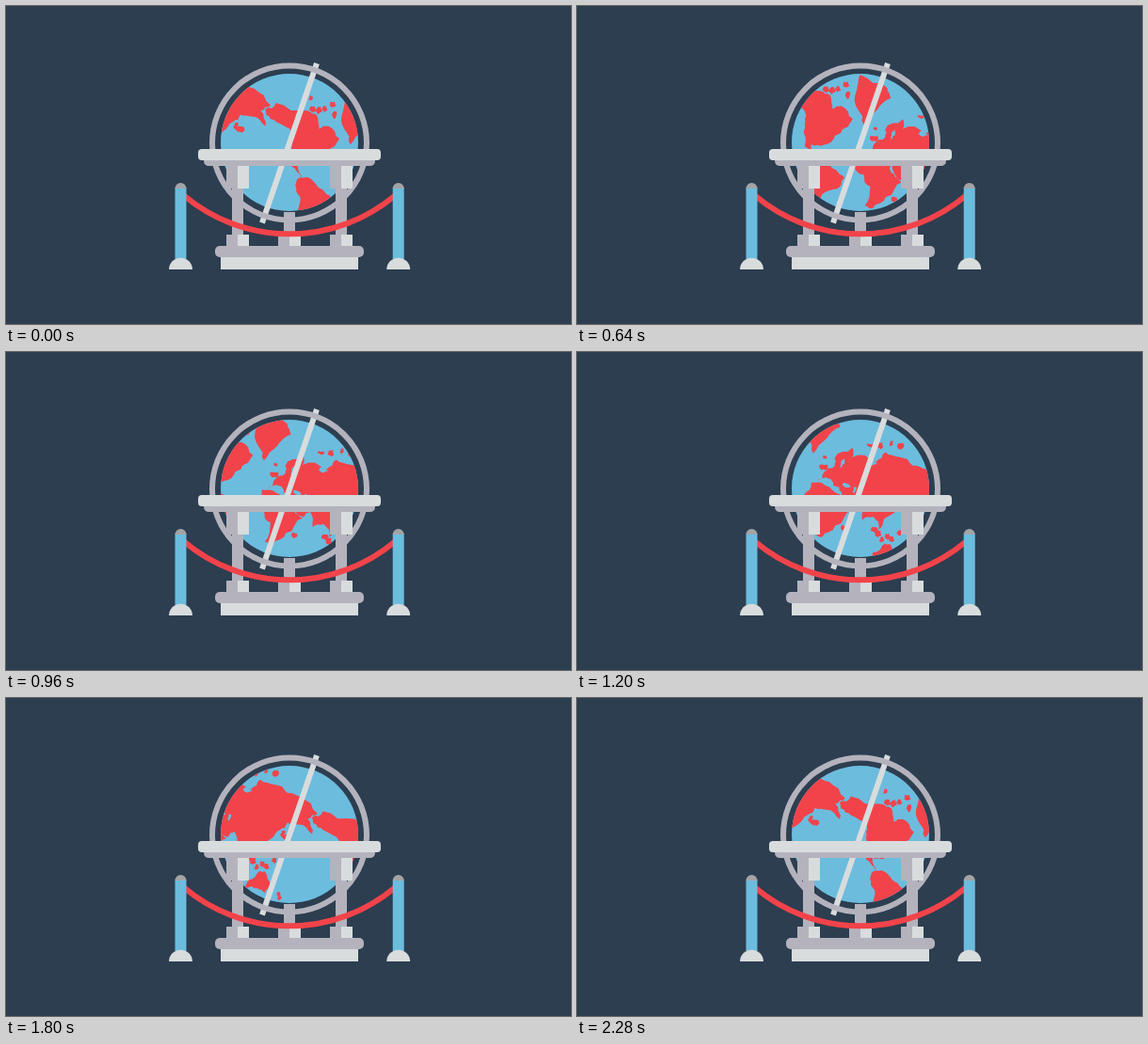
An HTML page for the animation above (2.36 s loop, 600 px wide and 338 px high).

```html
<!DOCTYPE html>
<html lang="en">
<head>
<meta charset="utf-8">
<title>Globe</title>
<style>
  html, body { margin: 0; width: 100%; height: 100%; overflow: hidden; background: #2c3e50; }
  svg { display: block; width: 100%; height: 100%; }
  .light { fill: #d8dcdd; }
  .gray { fill: #b4b3bd; }
  .blue { fill: #6cbcde; }
  .red { fill: #f2434a; }
  .line { fill: none; stroke-width: 6; }
</style>
</head>
<body>
<svg viewBox="0 0 600 338">
  <defs>
    <clipPath id="ball"><circle cx="301" cy="145" r="73"/></clipPath>
    <g id="world"><path id="land" class="red"/><path id="seas" class="blue"/></g>
    <g id="leg">
      <path class="gray" d="M240 170h12v85h-12zM234 170h12v24h-12zM234 243h12v12h-12z"/>
      <path class="light" d="M246 170h12v24h-12zM246 243h12v12h-12z"/>
    </g>
    <g id="post">
      <path class="blue" d="M179.500 193h12v76h-12z"/>
      <path fill="#a3a3a6" d="M179.500 194a6 6 0 0 1 12 0z"/>
      <path class="light" d="M173 280a12.500 12.300 0 0 1 25 0z"/>
    </g>
  </defs>

  <circle class="blue" cx="301" cy="145" r="73"/>
  <g clip-path="url(#ball)">
    <g transform="translate(301 145) rotate(19)">
      <g id="map">
        <use href="#world" class="copy"/>
        <use href="#world" class="copy"/>
        <use href="#world" class="copy"/>
      </g>
    </g>
  </g>
  <path class="line" d="M330 61L272 230.500" stroke="#d8dcdd"/>
  <circle class="line" cx="301" cy="145.500" r="82" stroke="#b4b3bd"/>

  <path class="gray" d="M295 219h12v36h-12zM289 243h12v12h-12z"/>
  <path class="light" d="M301 243h12v12h-12z"/>
  <use href="#leg"/>
  <use href="#leg" x="110"/>
  <path class="gray" d="M210 164h182q0 6-6 6h-170q-6 0-6-6z"/>
  <rect class="light" x="204" y="152" width="194" height="12" rx="4"/>
  <rect class="gray" x="222" y="255" width="158" height="12" rx="5"/>
  <path class="light" d="M228 267h146v13h-146z"/>

  <path class="line" d="M189 201.500A174 174 0 0 0 413 201.500" stroke="#f2434a"/>
  <use href="#post"/>
  <use href="#post" x="231.200"/>
</svg>
<script>
const LOOP = 2360, TICK = 40, STEPS = 58, STRIDE = 4.05;
const $ = id => document.getElementById(id);

let seed = 7;
const random = () => (seed = seed * 16807 % 2147483647) / 2147483647;
const jitter = size => (random() - 0.5) * size;

// Splits an edge at a displaced midpoint, so that a few points give a ragged coast.
function ragged([x, y], [u, v], depth = 2) {
  if (!depth) return [[u, v]];
  const k = jitter(0.4);
  const mid = [(x + u) / 2 + (v - y) * k, (y + v) / 2 - (u - x) * k];
  return [...ragged([x, y], mid, depth - 1), ...ragged(mid, [u, v], depth - 1)];
}

function coast(points) {
  const line = points.flatMap((p, i) => ragged(p, points[(i + 1) % points.length]));
  return "M" + line.join("L") + "z";
}

const parse = text => text.split(" ").map(p => p.split(",").map(Number));

function blob(x, y, rx, ry) {
  return coast([0, 1, 2, 3, 4].map(i => {
    const a = i * Math.PI * 0.4, r = 0.8 + random() * 0.5;
    return [x + rx * r * Math.cos(a), y + ry * r * Math.sin(a)];
  }));
}

// Islands lie evenly along a strip, each a little off the line.
function isles([x, y, count, width, height]) {
  return Array.from({ length: count }, (_, i) => blob(
    x + width * ((i + 0.5) / count - 0.5), y + jitter(height),
    2 + random() * 2, 2 + random() * 2)).join("");
}

const continents = {
  northAmerica: `-36,-25 -27,-35 7,-38 18,-37 25,-24 33,-30 49,-21 44,-9 37,2 29,15 16,19 25,33 10,23 4,4 1,-8 -13,-15 -27,-17`,
  greenland: `41,-68 73,-64 80,-55 70,-38 62,-19 51,-32 43,-50`,
  southAmerica: `22,32 38,31 50,36 61,41 55,56 44,71 36,82 31,54 23,44`,
  africa: `70,11 67,26 79,31 90,41 91,62 100,62 109,46 121,25 112,23 103,13 85,9`,
  eurasia: `76,8 79,-3 88,-14 85,-21 99,-38 102,-28 128,-32 134,-45 150,-45 166,-41 181,-42 203,-31 195,-22 205,-8 188,-13 176,-11 171,-1 165,11 156,22 154,35 144,24 134,31 126,16 121,24 104,11 100,6 93,6 86,1`,
  australia: `157,69 156,60 165,47 171,46 181,58 178,67 169,65`
};

// x, y, count, width, height
const islands = [
  [21, -47, 6, 36, 12],   // Canadian Arctic
  [132, -53, 4, 40, 14],  // Russian Arctic
  [77, -9, 2, 7, 3],      // British Isles
  [75, -19, 1, 0, 0],     // Iceland
  [163, 37, 6, 30, 14],   // East Indies
  [179, 3, 3, 12, 6],     // Japan
  [119, 45, 1, 0, 0],     // Madagascar
  [193, 67, 2, 5, 8]      // New Zealand
];

$("land").setAttribute("d",
  Object.values(continents).map(c => coast(parse(c))).join("") +
  islands.map(isles).join(""));

// Baltic, Black Sea, Caspian, Kara Sea
$("seas").setAttribute("d",
  blob(95, -19, 2, 6) + blob(106, 2, 5, 2) + blob(116, 4, 2, 4) + blob(124, -30, 5, 3));

const slide = n => `translate(${n * STRIDE} 0)`;
document.querySelectorAll(".copy").forEach((copy, i) =>
  copy.setAttribute("transform", slide((i - 1) * STEPS)));

function draw(now) {
  const step = Math.min(Math.floor(now % LOOP / TICK), STEPS - 1);
  $("map").setAttribute("transform", slide(-step));
  requestAnimationFrame(draw);
}
draw(performance.now());
</script>
</body>
</html>
```
